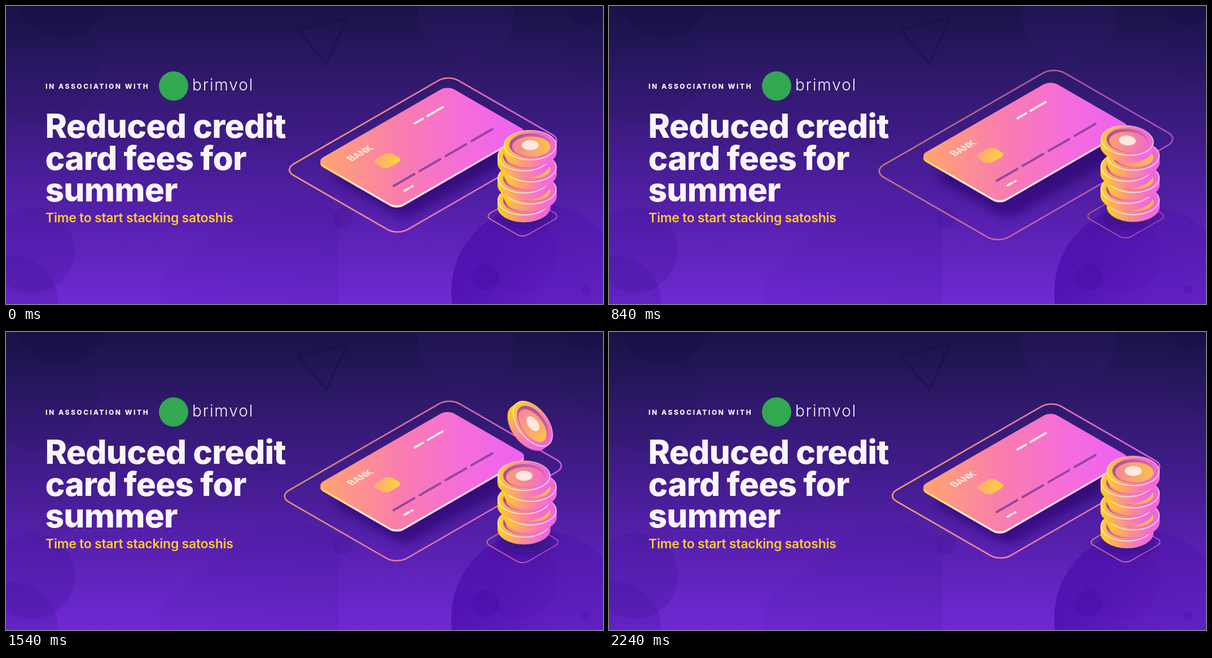
Animation of 1058x529 px, one loop 2310 ms. Source, as an HTML page without scripts:

```html
<!DOCTYPE html>
<html lang="en">
<head>
<meta charset="utf-8">
<title>Reduced credit card fees</title>
<style>
  html, body { margin: 0; width: 100%; height: 100%; overflow: hidden; background: #45208f; }
  svg { display: block; width: 100%; height: 100%; }
  text { font-family: Inter, "Open Sans", sans-serif; fill: #f8f6fb; }
  .lead { font-size: 12px; font-weight: 800; letter-spacing: 2.55px; }
  .brand { font-size: 28px; font-weight: 300; letter-spacing: 1.9px; }
  .title { font-size: 58.5px; font-weight: 800; letter-spacing: -.75px; }
  .sub { font-size: 23px; font-weight: 600; letter-spacing: -.25px; fill: #ffca2f; }
  .bank { font: 600 18px Roboto, Inter, sans-serif; letter-spacing: -.6px; fill: #ffe6dc; }

  .frame { fill: none; vector-effect: non-scaling-stroke; }
  .dash { fill: none; stroke-width: 4; stroke-linecap: round; }

  .bob, .pulse { animation: 2310ms cubic-bezier(.3, .3, .2, 1) infinite; }
  .bob { animation-name: bob; }
  .pulse { animation-name: pulse; }
  @keyframes bob { 50% { transform: translateY(-9.5px); } }
  @keyframes pulse { 50% { transform: scale(1.102); opacity: .68; } }

  /* two alternating stacks, one coin lands in each */
  .stack { animation: show 2310ms step-end infinite; }
  .stack.b { animation-delay: -1155ms; }
  @keyframes show { 0% { opacity: 1; } 50%, 100% { opacity: 0; } }

  .stack > use { animation: drop 1155ms cubic-bezier(.35, .15, .22, 1) infinite; }
  .stack > use:nth-child(2) { animation-timing-function: cubic-bezier(.3, .3, .2, 1); }
  .stack > use:nth-child(n+5) { animation-timing-function: cubic-bezier(.4, 0, .25, 1); }
  .stack > use:first-child { animation: fade 1155ms linear infinite; }
  .fall {
    animation: fall 1155ms cubic-bezier(.4, 0, .25, 1) infinite,
               appear 1155ms linear infinite;
  }
  @keyframes drop { to { transform: translateY(19.6px); } }
  @keyframes fade { 15%, 100% { opacity: 0; } }
  @keyframes appear { 0% { opacity: 0; } 33%, 100% { opacity: 1; } }
  @keyframes fall {
    from { transform: translate(var(--x), 105px) rotate(90deg); }
    to { transform: translate(var(--x), 253px) rotate(0deg); }
  }
</style>
</head>
<body>
<svg viewBox="0 0 1058 529" preserveAspectRatio="none">
  <defs>
    <linearGradient id="sky" x2="0" y2="1">
      <stop stop-color="#191347"/>
      <stop offset=".25" stop-color="#30196c"/>
      <stop offset=".5" stop-color="#441c8f"/>
      <stop offset=".75" stop-color="#5a21b4"/>
      <stop offset="1" stop-color="#7029d3"/>
    </linearGradient>
    <linearGradient id="planet">
      <stop stop-color="#4a0bab" stop-opacity=".75"/>
      <stop offset=".55" stop-color="#4a0fa8" stop-opacity=".4"/>
      <stop offset="1" stop-color="#4a12a8" stop-opacity=".35"/>
    </linearGradient>
    <linearGradient id="hill">
      <stop stop-color="#3c0f94" stop-opacity=".08"/>
      <stop offset="1" stop-color="#3c0f94" stop-opacity=".15"/>
    </linearGradient>
    <linearGradient id="line" gradientUnits="userSpaceOnUse" x2="285" y2="285">
      <stop stop-color="#ffb066"/>
      <stop offset=".45" stop-color="#fb8a9c"/>
      <stop offset="1" stop-color="#ec66ee"/>
    </linearGradient>
    <linearGradient id="base" gradientUnits="userSpaceOnUse" x2="77" y2="77">
      <stop stop-color="#ffb066"/>
      <stop offset="1" stop-color="#ec66d8"/>
    </linearGradient>
    <linearGradient id="card" gradientUnits="userSpaceOnUse" x2="216" y2="216">
      <stop stop-color="#ffa76c"/>
      <stop offset=".4" stop-color="#f97daf"/>
      <stop offset=".7" stop-color="#f56ddb"/>
      <stop offset="1" stop-color="#ed61f4"/>
    </linearGradient>
    <linearGradient id="edge" gradientUnits="userSpaceOnUse" x2="216" y2="216">
      <stop stop-color="#ffcf2e"/>
      <stop offset=".2" stop-color="#ffe7d2"/>
      <stop offset=".5" stop-color="#ffe9e4"/>
      <stop offset="1" stop-color="#fbb4f3"/>
    </linearGradient>
    <linearGradient id="chip" x2="1" y2="1">
      <stop stop-color="#fda37c"/>
      <stop offset=".55" stop-color="#fdc052"/>
      <stop offset="1" stop-color="#ffd83c"/>
    </linearGradient>
    <linearGradient id="side">
      <stop stop-color="#ffd21c"/>
      <stop offset=".2" stop-color="#ffb44c"/>
      <stop offset=".5" stop-color="#fb8a9a"/>
      <stop offset=".78" stop-color="#f56fd0"/>
      <stop offset="1" stop-color="#f064e8"/>
    </linearGradient>
    <linearGradient id="ring">
      <stop stop-color="#ffd02c"/>
      <stop offset=".35" stop-color="#fb9a7a"/>
      <stop offset=".7" stop-color="#f270c0"/>
      <stop offset="1" stop-color="#ef68de"/>
    </linearGradient>
    <linearGradient id="shine" x2="0" y2="1">
      <stop stop-color="#fff3e4" stop-opacity=".35"/>
      <stop offset="1" stop-color="#fff6ee"/>
    </linearGradient>
    <linearGradient id="dent">
      <stop stop-color="#a94f9c"/>
      <stop offset="1" stop-color="#d964b4"/>
    </linearGradient>
    <linearGradient id="warm">
      <stop stop-color="#f5869a"/>
      <stop offset="1" stop-color="#ffc247"/>
    </linearGradient>
    <linearGradient id="cool">
      <stop stop-color="#fb9f72"/>
      <stop offset="1" stop-color="#f06fc4"/>
    </linearGradient>
    <filter id="soft" x="-20%" y="-20%" width="140%" height="140%">
      <feGaussianBlur stdDeviation="8"/>
    </filter>

    <g id="rim">
      <path d="M-47-6V6A47 27 0 0 0 47 6V-6Z" fill="url(#side)"/>
      <ellipse cy="-6" rx="47" ry="27" fill="url(#ring)"/>
      <ellipse cy="-6" rx="46" ry="26" fill="none" stroke="url(#shine)" stroke-width="1.7"/>
      <ellipse cy="-6" rx="37" ry="21" fill="url(#dent)"/>
    </g>
    <g id="left">
      <use href="#rim"/>
      <ellipse cx="2" cy="-3.5" rx="34" ry="18" fill="url(#cool)"/>
      <ellipse cy="-6" rx="15" ry="9" fill="#ffe8e0"/>
    </g>
    <g id="right">
      <use href="#rim"/>
      <ellipse cx="2" cy="-3.5" rx="34" ry="18" fill="url(#warm)"/>
      <ellipse cy="-6" rx="15" ry="9" fill="#ffe8e0"/>
    </g>
  </defs>

  <rect width="1058" height="529" fill="url(#sky)"/>

  <g fill="#150d45">
    <circle cx="98" cy="-22" r="80" opacity=".28"/>
    <circle cx="60" cy="105" r="105" opacity=".08"/>
    <circle cx="815" cy="12" r="85" fill="#3a1d7a" opacity=".2"/>
    <circle cx="1028" cy="-4" r="38" opacity=".2"/>
    <circle cx="1058" cy="72" r="71" opacity=".06"/>
    <circle cx="457" cy="234" r="14" opacity=".1"/>
    <path d="M517 42 604 22 568 102Z" fill="none" stroke="#150d45" stroke-width="5" opacity=".36"/>
  </g>
  <g fill="#3a0f8c">
    <circle cx="46" cy="433" r="76" opacity=".22"/>
    <circle cx="10" cy="526" r="82" opacity=".22"/>
    <circle cx="597" cy="377" r="18" opacity=".22"/>
  </g>
  <path d="M272 500Q276 478 300 460L418 366Q470 325 540 342Q575 352 590 372V529H275Z" fill="url(#hill)"/>
  <circle cx="945" cy="508" r="156" fill="url(#planet)"/>
  <g fill="#43099c">
    <circle cx="908" cy="440" r="70" opacity=".1"/>
    <circle cx="850" cy="482" r="24" opacity=".3"/>
    <circle cx="1027" cy="503" r="8" opacity=".25"/>
  </g>

  <text class="lead" x="70" y="147">IN ASSOCIATION WITH</text>
  <circle cx="297" cy="142" r="26" fill="#32a850"/>
  <text class="brand" x="330" y="149.5">brimvol</text>
  <g class="title">
    <text x="69.500" y="234">Reduced credit</text>
    <text x="69.500" y="291">card fees for</text>
    <text x="69.500" y="347">summer</text>
  </g>
  <text class="sub" x="70" y="384">Time to start stacking satoshis</text>

  <g class="pulse" style="transform-origin:739px 264.5px">
    <rect class="frame" transform="matrix(.866 -.5 .866 .5 492.1 290.5)" width="337" height="233" rx="20" stroke="url(#line)" stroke-width="2.4"/>
  </g>
  <g class="pulse" style="transform-origin:915.5px 373px">
    <rect class="frame" transform="matrix(.866 -.5 .866 .5 849 373)" width="76.8" height="76.800" rx="11" stroke="url(#base)" stroke-width="1.3"/>
  </g>

  <g fill="#2a0c6b" filter="url(#soft)">
    <rect transform="matrix(.866 -.5 .866 .5 572 302)" width="262" height="156" rx="18" opacity=".58"/>
    <ellipse cx="921" cy="372" rx="44" ry="20" opacity=".6"/>
  </g>

  <g class="bob">
    <rect transform="matrix(.866 -.5 .866 .5 550 279.5)" width="268.500" height="164.500" rx="14" fill="url(#edge)"/>
    <g transform="matrix(.866 -.5 .866 .5 550 275.5)">
      <rect width="268.500" height="164.500" rx="14" fill="url(#card)"/>
      <rect x="56" y="57" width="35" height="29" rx="9" fill="url(#chip)"/>
      <text class="bank" x="35.500" y="37">BANK</text>
    </g>
    <path class="dash" stroke="#ffe6e0" d="M724 208.500l15-8.600M747 195.200l27-15.600M706 328l8-4.600M718.500 321l2-1.200"/>
    <path class="dash" stroke="#95479f" d="M687 319.500l36.500-21M733 293l36.500-21M779 266.400l36.500-21M825 239.800l37-21.300"/>
  </g>

  <g class="stack a" style="--x:918px">
    <use href="#left" x="918" y="351"/>
    <use href="#right" x="929" y="331.4"/>
    <use href="#left" x="918" y="311.8"/>
    <use href="#right" x="929" y="292.2"/>
    <use href="#left" x="918" y="272.6"/>
    <use href="#right" x="929" y="253"/>
    <g class="fall"><use href="#left"/></g>
  </g>
  <g class="stack b" style="--x:929px">
    <use href="#right" x="929" y="351"/>
    <use href="#left" x="918" y="331.4"/>
    <use href="#right" x="929" y="311.8"/>
    <use href="#left" x="918" y="292.2"/>
    <use href="#right" x="929" y="272.6"/>
    <use href="#left" x="918" y="253"/>
    <g class="fall"><use href="#right"/></g>
  </g>
</svg>
</body>
</html>
```
